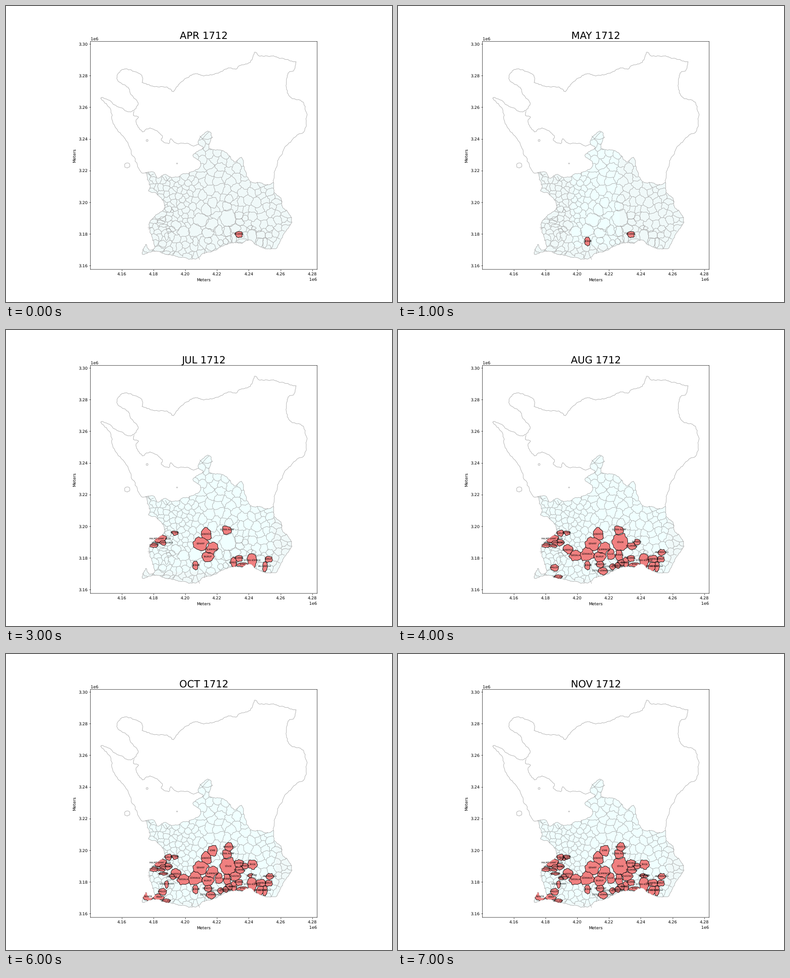
Write a matplotlib script that moves like this. It is 853 px wide and 656 px high and loops after 8000 ms.

```python
import math

import matplotlib.pyplot as plt
import numpy as np
from matplotlib.animation import FuncAnimation
from matplotlib.collections import LineCollection
from matplotlib.patches import Polygon, Rectangle
from matplotlib.path import Path

plt.rcParams["text.hinting"] = "none"

W, H, DPI = 853, 656, 65.6
SCALE = 284.9  # metres per pixel
GREY = "darkgray"
MONTHS = ["APR", "MAY", "JUN", "JUL", "AUG", "SEP", "OCT", "NOV"]
rng = np.random.default_rng(1712)

# Key points of the outlines, in stage pixels with y down.
COAST = [
    (591, 391), (594, 415), (608, 426), (611, 445), (629, 465), (629, 484),
    (612, 508), (600, 534), (591, 538), (567, 536), (537, 518), (520, 526),
    (505, 524), (476, 532), (464, 541), (437, 548), (418, 561), (390, 557),
    (357, 551), (333, 543), (313, 547), (301, 550), (309, 528), (316, 541),
    (329, 533), (318, 495), (317, 480), (335, 461), (348, 452), (350, 437),
    (333, 416), (315, 410), (319, 400), (309, 369),
]
BORDER = [
    (309, 369), (326, 368), (336, 382), (351, 373), (366, 380), (396, 372),
    (425, 361), (430, 346), (413, 331), (436, 314), (425, 306), (428, 293),
    (446, 277), (455, 290), (448, 315), (482, 322), (504, 346), (520, 335),
    (527, 358), (540, 389), (561, 391), (577, 397), (591, 391),
]
WEST = [
    (309, 369), (297, 366), (276, 318), (261, 291), (237, 261), (229, 225),
    (209.5, 205), (222, 206), (263, 232), (283, 231), (292, 214), (276, 196),
    (270, 180), (247, 165), (248, 149), (266, 139), (298, 152), (301, 169),
]
NORTH = [
    (301, 169), (320, 177), (357, 180), (369, 190), (381, 174), (407, 154),
    (423, 150), (437, 155), (468, 149), (491, 137), (508, 140), (516, 132),
    (540, 125), (550, 102), (560, 111), (588, 111), (607, 116), (641, 124),
]
EAST = [
    (641, 124), (636, 143), (623, 149), (620, 185), (630, 203), (657, 213),
    (664, 247), (658, 279), (643, 286), (613, 320), (596, 360), (591, 391),
]
INLAND = [
    (283, 233), (282, 243), (293, 246), (287, 256), (301, 279), (318, 270),
    (345, 287), (343, 297), (360, 305), (364, 294), (376, 304), (400, 304),
    (413, 310), (425, 306),
]


def to_map(points):
    p = np.asarray(points, float)
    return np.column_stack([4.16e6 + (p[:, 0] - 255.6) * SCALE,
                            3.16e6 + (575.4 - p[:, 1]) * SCALE])


def noise(x, y):
    v = math.sin(x * 12.9898 + y * 78.233) * 43758.5453
    return 2 * (v - math.floor(v)) - 1


def rough_edge(a, b, depth, amp):
    """Midpoint displacement that gives the same line in both directions."""
    if depth == 0:
        return [a]
    (x0, y0), (x1, y1) = sorted((a, b))
    mx, my = (x0 + x1) / 2, (y0 + y1) / 2
    d = noise(mx, my) * amp
    mid = (mx + d * (y0 - y1), my + d * (x1 - x0))
    return (rough_edge(a, mid, depth - 1, amp)
            + rough_edge(mid, b, depth - 1, amp))


def rough(points, depth, amp):
    points = [tuple(map(float, p)) for p in points]
    out = []
    for a, b in zip(points, points[1:]):
        out += rough_edge(a, b, depth, amp)
    return out + [points[-1]]


def shore(keys, steps=3):
    """Catmull-Rom curve through the key points, slightly ragged."""
    p = np.array([keys[0], *keys, keys[-1]], float)
    out = []
    for a, b, c, d in zip(p, p[1:], p[2:], p[3:]):
        for t in np.arange(steps) / steps:
            out.append(b + t / 2 * (c - a + t * (2 * a - 5 * b + 4 * c - d
                                                 + t * (3 * (b - c) + d - a))))
    return rough(out + [p[-1]], 2, 0.17)


def blob(x, y, a, b, n=11):
    """Irregular polygon around an ellipse with half-axes a and b."""
    turn = 2 * np.pi * (np.arange(n) + rng.uniform(-0.3, 0.3, n)) / n
    r = rng.uniform(0.93, 1.22, n)
    return list(zip(x + a * r * np.cos(turn), y + b * r * np.sin(turn)))


def cut(poly, normal, limit):
    """Keep the part of a polygon where p . normal <= limit."""
    out = []
    side = [p[0] * normal[0] + p[1] * normal[1] - limit for p in poly]
    for i, q in enumerate(poly):
        p, sp, sq = poly[i - 1], side[i - 1], side[i]
        if (sp <= 0) != (sq <= 0):
            t = sp / (sp - sq)
            out.append((p[0] + t * (q[0] - p[0]), p[1] + t * (q[1] - p[1])))
        if sq <= 0:
            out.append(q)
    return out


class Parish:
    """A named parish: label centre and half width and height."""

    def __init__(self, month, name, x, y, a=8, b=7):
        self.month, self.name = month, name
        self.spot, self.size = np.array([x, y], float), (a, b)

    def reach(self, way):
        return 1 / math.hypot(way[0] / self.size[0], way[1] / self.size[1])

    def shape(self, others):
        poly = blob(*self.spot, *self.size)
        for o in others:
            n = o.spot - self.spot
            if o is self or np.hypot(*n) > 60:
                continue
            share = self.reach(n) / (self.reach(n) + o.reach(n))
            poly = cut(poly, n, n @ (self.spot + share * n))
        return rough(poly + poly[:1], 2, 0.18)


OUTBREAKS = [
    [("BROMMA", 515, 506)],
    [("GRÖNBY", 419, 522, 6, 10)],
    [("MALMÖ SANKT PETRI", 341, 463, 16, 8), ("VEBERÖD", 443, 453, 11, 14),
     ("GENARP", 430, 474, 17, 15), ("SLIMMINGE", 455, 487, 13, 16),
     ("YSTAD", 522, 520, 15, 4)],
    [("TOTTARP", 372, 450, 8, 5), ("LIMHAMN", 327, 477, 9, 5),
     ("VÄSTRA SKRÄVLINGE", 346, 472, 9, 5), ("SKURUP", 446, 503, 13, 11),
     ("SÖDRA ÅSUM", 488, 443, 10, 9), ("STORA KÖPINGE", 544, 511, 10, 15),
     ("BJÄRESJÖ", 503, 515, 7, 10), ("VALLEBERGA", 572, 524, 5, 12),
     ("HÖRUP", 580, 508)],
    [("BURLÖV", 360, 451), ("HUSIE", 358, 471), ("FOSIE", 343, 478, 10, 4),
     ("SKABERSJÖ", 376, 487, 11, 10), ("SVEDALA", 392, 500, 14, 11),
     ("BÖRRINGE", 418, 497, 16, 14), ("HÅSLÖV", 346, 527),
     ("MAGLARP", 354, 547, 9, 4), ("ÖSTRA VEMMENHÖG", 453, 534, 10, 8),
     ("SVENSTORP", 447, 520), ("VILLIE", 470, 497, 9, 12),
     ("VÄSTRA NÖBBELÖV", 474, 525, 6, 6), ("SÖVDE", 492, 471, 16, 19),
     ("SNÅRESTAD", 486, 522, 6, 6), ("SKÅRBY", 489, 499, 8, 12),
     ("BALKÅKRA", 494, 516), ("BALDRINGE", 517, 479, 11),
     ("RAMSÅSA", 528, 470), ("HAMMENHÖG", 583, 493),
     ("GLEMMINGE", 563, 508, 11, 8), ("INGELSTORP", 562, 524, 8, 10)],
    [("VOMB", 457, 436, 10, 12), ("BRANDSTAD", 493, 428, 9, 9),
     ("RÖDDINGE", 515, 464, 11, 8), ("TRYDE", 544, 467, 10, 10),
     ("ULLSTORP", 543, 491, 8, 5), ("SÖDRA ÅKARP", 355, 510, 4, 8),
     ("TÖRRINGE", 367, 494, 9, 5), ("SKANÖR", 314, 538, 12, 9),
     ("RÄNG", 338, 539, 14, 6)],
    [("LOCKARP", 347, 487, 10, 3), ("SÖVESTAD", 506, 493, 13, 9)],
    [("ARRIE", 362, 497, 7, 3), ("BRÅGARP", 367, 454, 5, 3),
     ("TOSTERUP", 545, 492, 8, 3)],
]


def spacing(x, y):
    size = np.interp(x, [320, 400, 440, 530, 600], [10, 11, 18, 17, 14])
    if x < 365 and y > 478:
        return 1.7 * size, 0.7 * size
    if x < 475 and y > 505:
        return 0.7 * size, 1.4 * size
    return size, 0.85 * size


def scatter_sites(region, blocks):
    sites = np.empty((0, 2))
    for spot in rng.uniform((300, 275), (632, 562), (4500, 2)):
        inside = region.contains_point(spot)
        if not inside or any(b.contains_point(spot) for b in blocks):
            continue
        gap = rng.uniform(0.75, 1.15) * np.array(spacing(*spot))
        if (np.hypot(*((sites - spot) / gap).T) > 1).all():
            sites = np.vstack([sites, spot])
    return sites


def cell_edges(sites):
    edges = set()
    for s in sites:
        order = np.argsort(((sites - s) ** 2).sum(1))[1:26]
        cell = [tuple(s + d) for d in
                [(-60, -60), (60, -60), (60, 60), (-60, 60)]]
        for o in sites[order]:
            cell = cut(cell, o - s, (o - s) @ (o + s) / 2)
        cell = [(round(float(px), 1), round(float(py), 1)) for px, py in cell]
        for a, b in zip(cell, cell[1:] + cell[:1]):
            if a != b:
                edges.add((min(a, b), max(a, b)))
    return sorted(edges)


def mesh_lines(region, blocks):
    """Cell borders inside the region, left out where a named parish lies."""
    lines = []
    for edge in cell_edges(scatter_sites(region, blocks)):
        pts = np.array(rough(edge, 3, 0.22))
        mids = (pts[1:] + pts[:-1]) / 2
        keep = region.contains_points(mids)
        for block in blocks:
            keep &= ~block.contains_points(mids)
        run = []
        for a, b, ok in zip(pts, pts[1:], [*keep]):
            if ok:
                run = (run or [a]) + [b]
            elif run:
                lines.append(to_map(run))
                run = []
        if run:
            lines.append(to_map(run))
    return lines


fig, ax = plt.subplots(figsize=((W + 0.01) / DPI, (H + 0.01) / DPI), dpi=DPI)
ax.set_aspect("equal")
(left, top), (right, bottom) = to_map([(186.7, 78.7), (687.7, 583.8)])
ax.set_xlim(left, right)
ax.set_ylim(bottom, top)
ax.set_xticks(np.arange(416, 429, 2) * 1e4)
ax.set_yticks(np.arange(316, 331, 2) * 1e4)
ax.set_xlabel("Meters")
ax.set_ylabel("Meters")
title = ax.set_title("APR 1712", fontsize=24)
for spine in ax.spines.values():
    spine.set_snap(False)


def add_polygon(points, **style):
    return ax.add_patch(Polygon(to_map(points), closed=True, **style))


outline = shore(COAST) + shore(BORDER)
south = add_polygon(outline, fc="#f0f9f9", ec="none", zorder=1)
add_polygon(outline, fc="none", ec=GREY, lw=1, zorder=2)
for keys in (WEST, NORTH, EAST, INLAND):
    ax.plot(*to_map(shore(keys)).T, color=GREY, lw=1)
for island in [(268, 353, 6, 5), (312, 298, 2, 2), (378, 349, 1, 1)]:
    add_polygon(blob(*island), fc="none", ec=GREY, lw=1)

parishes = [Parish(month, *row)
            for month, rows in enumerate(OUTBREAKS) for row in rows]
outlines = [p.shape(parishes) for p in parishes]
mesh = mesh_lines(Path(outline), [Path(o) for o in outlines])
ax.add_collection(LineCollection(mesh, colors=GREY, linewidths=1, zorder=2),
                  autolim=False)

shapes = []
for p, points in zip(parishes, outlines):
    shape = add_polygon(points, lw=1)
    shape.set_clip_path(south)
    label = ax.text(*to_map([p.spot])[0], p.name, fontsize=5, ha="center",
                    va="center", zorder=6)
    shapes.append((p.month, shape, label))

# Each month the land around the new parishes turns a little brighter.
tints = []
for month in range(1, len(MONTHS)):
    xs, ys = [384, 490], [57]
    for p, points in zip(parishes, outlines):
        if p.month == month:
            px, py = zip(*points)
            half = 1.4 * len(p.name)
            xs += [*px, p.spot[0] - half, p.spot[0] + half]
            ys += py
    (x0, y0), (x1, y1) = to_map([(min(xs), min(ys)), (max(xs), max(ys))])
    tint = ax.add_patch(Rectangle((x0, y1), x1 - x0, y0 - y1, fc="azure",
                                  ec="none", zorder=1.1))
    tint.set_clip_path(south)
    tints.append((month, tint))


def draw(step):
    title.set_text(f"{MONTHS[step]} 1712")
    for month, tint in tints:
        tint.set_visible(month <= step)
    for month, shape, label in shapes:
        hit = month <= step
        shape.set_facecolor("lightcoral" if hit else "none")
        shape.set_edgecolor("black" if hit else GREY)
        shape.set_zorder(4 if hit else 2)
        label.set_visible(hit)
    return []


anim = FuncAnimation(fig, draw, frames=len(MONTHS), init_func=lambda: draw(0),
                     interval=1000, repeat=True, blit=False)
plt.show()
```
